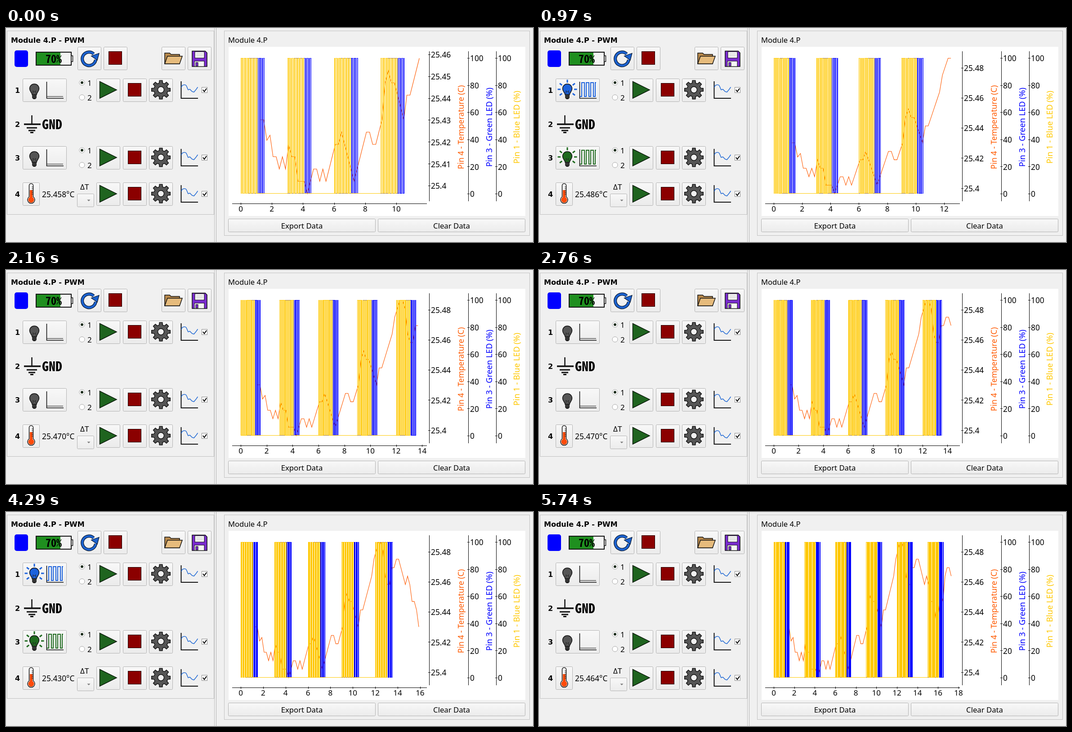
An HTML page with a canvas for the animation above (5810 ms loop, 1172x478 px).

```html
<!DOCTYPE html>
<html lang="en">
<head>
<meta charset="utf-8">
<title>Module 4.P</title>
<style>
  html, body { margin: 0; width: 100%; height: 100%; overflow: hidden; background: #f0f0f0; }
  canvas { display: block; }
</style>
</head>
<body>
<canvas id="stage" width="1172" height="478"></canvas>
<script>
const ctx = document.getElementById('stage').getContext('2d');
const LOOP = 5810;
const SANS = '"Noto Sans", "Open Sans", sans-serif';
const HEADING = '"DejaVu Sans", sans-serif';
const MONO = '"Noto Sans Mono CJK JP", "Noto Sans Mono CJK SC", "Liberation Mono", monospace';
const ORANGE = '#ff5a00', BLUE = '#0000ff', YELLOW = '#ffc800';

// Moments (ms) at which the display refreshes
const REFRESHES = [-120, 120, 380, 450, 510, 710, 910, 970, 1100, 1300, 1500, 1560, 1700, 1960,
  2160, 2300, 2500, 2760, 2890, 3100, 3370, 3430, 3570, 3760, 3960, 4160, 4290, 4490, 4560,
  4760, 4890, 5150, 5350, 5480, 5740];

// Temperature readings in sensor steps, one every 0.2 s
const READINGS = [0, 0, -1.67, -1.25, -3, -3, -4, -3, -4, -2, -3, -3, -5, -5, -5, -6, -5, -4, -4, -5,
  -4, -5, -4, -3, -2, -2, -1, -2, -3, -4, -5, -4, -3, -2, -1, -1, -2, -2, -1, 0,
  3, 4, 3, 3, 2, 1, 0, 2, 2, 3, 4, 5, 6, 8, 9, 10, 10, 9, 6, 5,
  5, 7, 7, 8, 8, 7, 6, 5, 6, 5, 3, 3, 2, 0, 2, 4, 3, 6, 7, 7, 6];
const degrees = step => 25.4302 + 0.00562 * step;

const TOP = 67.5, BOTTOM = 370, LEFT = 522;

function rect(x, y, w, h, fill, stroke, lineWidth = 1) {
  if (fill) { ctx.fillStyle = fill; ctx.fillRect(x, y, w, h); }
  if (stroke) { ctx.strokeStyle = stroke; ctx.lineWidth = lineWidth; ctx.strokeRect(x, y, w, h); }
}

function shape(path, fill, stroke, lineWidth = 1.5) {
  const p = new Path2D(path);
  if (fill) { ctx.fillStyle = fill; ctx.fill(p); }
  if (stroke) { ctx.strokeStyle = stroke; ctx.lineWidth = lineWidth; ctx.stroke(p); }
}

function circle(x, y, r, fill, stroke, lineWidth = 1.5) {
  shape(`M${x - r} ${y}a${r} ${r} 0 1 0 ${2 * r} 0a${r} ${r} 0 1 0 ${-2 * r} 0`, fill, stroke, lineWidth);
}

// y is the middle of the capitals
function label(text, x, y, { size = 17, weight = 400, align = 'left', color = '#000', font = SANS } = {}) {
  ctx.font = `${weight} ${size}px ${font}`;
  ctx.textAlign = align;
  ctx.fillStyle = color;
  ctx.fillText(text, x, y + size * 0.357);
}

function heading(text, x, y) {
  label(text, x, y, { size: 16, weight: 700, font: HEADING });
}

function button(x, y, w, h) {
  const shade = ctx.createLinearGradient(0, y, 0, y + h);
  shade.addColorStop(0, '#f8f8f8');
  shade.addColorStop(1, '#ebebeb');
  ctx.beginPath();
  ctx.roundRect(x + 0.5, y + 0.5, w - 1, h - 1, 2);
  ctx.fillStyle = shade;
  ctx.fill();
  ctx.strokeStyle = '#b2b2b2';
  ctx.lineWidth = 1;
  ctx.stroke();
}

function stopButton(x, y) {
  button(x, y, 53, 52);
  rect(x + 11.5, y + 10.5, 29, 29, '#8b0000', '#1a0000');
}

function gear(cx, cy) {
  const teeth = 8, points = [];
  for (let i = 0; i < teeth; i++) {
    for (const [turn, r] of [[-0.32, 15.5], [-0.2, 21], [0.2, 21], [0.32, 15.5]]) {
      const a = (i + turn) * 2 * Math.PI / teeth;
      points.push(`${cx + r * Math.cos(a)} ${cy + r * Math.sin(a)}`);
    }
  }
  shape(`M${points.join('L')}Z`, '#555', '#111');
  circle(cx, cy, 7, '#f1f1f1', '#111');
}

function channelControls() {
  button(201, 113, 53, 52);
  shape('M208.500 119.500V157L246 138.200Z', '#1f641f', '#0a1a0a');
  stopButton(260, 113);
  button(318, 113, 53, 52);
  gear(344.5, 138);
  shape('M389.500 119V157H427', null, '#111', 2);
  shape('M390 133Q391 128 394 127.500Q400 125 402 131L405 138L409 137L414 142L418 143L423 137L426.500 132',
    null, '#2a6fd6', 1.6);
  rect(435.5, 132.5, 12, 12, '#fff', '#8c8c8c');
  shape('M438 138L441 142L446 135', null, '#000', 2);
}

function radios() {
  for (const [text, y] of [['1', 122], ['2', 155]]) {
    circle(169, y, 6, '#fff', '#a6a6a6', 1);
    label(text, 181, y + 1);
  }
  circle(169, 122, 3, '#1c2c1c');
}

function ledButton(on, color) {
  button(37, 113, 98, 52);
  if (on) {
    for (const degree of [0, 38, 142, 180, 218, 270, 322]) {
      const a = degree * Math.PI / 180, c = Math.cos(a), s = Math.sin(a);
      shape(`M${63 + 15 * c} ${137 + 15 * s}L${63 + 21.5 * c} ${137 + 21.5 * s}`, null, color, 3);
    }
  }
  shape('M58 149C58 144 52.500 142 52.500 135.500A10.500 10.500 0 0 1 73.500 135.500C73.500 142 68 144 68 149Z',
    on ? color : '#555', '#111');
  shape('M58 148H68V156L65 159H61L58 156Z', '#222');
  shape('M58 151.500H68M58 154.500H68', null, '#666', 0.8);
  shape('M60 147V140L63 143L66 140V147', null, '#222', 1);
  shape('M90.500 120V157H128', null, '#111', 1.6);
  if (on) shape('M91 153H95V122H101V153H105V122H111V153H115V122H121V153H125V122H127', null, color, 2);
  else shape('M91 153H127', null, '#555', 1.4);
}

function atRow(dy, draw) {
  ctx.save();
  ctx.translate(0, dy);
  draw();
  ctx.restore();
}

function toolbar() {
  ctx.beginPath();
  ctx.roundRect(19, 50, 30, 37, 5);
  ctx.fillStyle = BLUE;
  ctx.fill();

  rect(67, 54, 78, 29, '#f4f4f4');
  rect(67, 54, 54, 29, '#1f8f1f');
  rect(67, 54, 78, 29, null, '#111', 2);
  rect(145, 62, 3.5, 13, '#f4f4f4', '#111', 1.5);
  label('70%', 106, 69, { size: 24, weight: 700, align: 'center', font: MONO });

  button(159, 42, 53, 52);
  const arc = 'M199.500 71A15 15 0 1 1 195 58';
  shape(arc, null, '#0a1a33', 7);
  shape(arc, null, '#1c62cf', 4.6);
  shape('M189.500 62.500L207 56.500L203 72Z', '#1c62cf', '#0a1a33', 1.3);

  stopButton(217, 42);

  button(346, 42, 53, 52);
  shape('M353 80V56H364L367 59H386V80Z', '#b98a4c', '#111');
  shape('M353 80L359 63H392L386 80Z', '#e6bb7c', '#111');

  button(404, 42, 53, 52);
  shape('M414 51.500H443L447 55.500V86H414Z', '#7a2bd0', '#111');
  rect(420, 53, 21, 14, '#f6f6f6', '#111');
  shape('M423 58H438M423 62H438', null, '#bbb', 1);
  rect(419, 74, 22, 12, '#f6f6f6', '#111');
  rect(422, 77, 5, 8, '#7a2bd0', '#111');
}

function controlPanel(led1, led3, temperature) {
  rect(2.5, 6.5, 460, 410, null, '#c0c0c0');
  rect(463, 0, 1, 478, '#bdbdbd');
  rect(467, 0, 1, 478, '#b0b0b0');
  heading('Module 4.P - PWM', 11, 27);
  toolbar();
  ['1', '2', '3', '4'].forEach((n, i) => heading(n, 20, [139, 215, 290, 371][i]));

  for (const [dy, on, color] of [[0, led1, '#1c62dc'], [151, led3, '#1f6a1f']]) {
    atRow(dy, () => { ledButton(on, color); radios(); channelControls(); });
  }
  atRow(232, channelControls);

  shape('M57.500 195V215', null, '#111', 2.5);
  shape('M40 215H77', null, '#111', 3.5);
  shape('M46 223H69M50 229H65M54 233.500H61', null, '#111', 2.8);
  label('GND', 80, 215, { size: 30, weight: 700, font: MONO });

  button(37, 345, 38, 52);
  shape('M51.500 377V352A4.500 4.500 0 0 1 60.500 352V377A8 8 0 1 1 51.500 377Z', '#fafafa', '#111');
  shape('M53 378V362H59V378A6.500 6.500 0 1 1 53 378Z', '#ff4a0a');
  shape('M57 355H60M57 359H60M57 363H60M57 367H60M57 371H60', null, '#111', 1);
  label(temperature.toFixed(3) + '°C', 80, 372, { size: 17.3 });
  label('ΔT', 165, 354.5);
  button(158, 370, 38, 30);
  shape('M180.500 383.500H187.500L184 387Z', '#777');
}

function verticalAxis(x, ticks, yOf) {
  rect(x, 52, 1, 335, '#000');
  for (const tick of ticks) {
    const y = yOf(tick);
    rect(x - 2, Math.round(y - 0.5), 5, 1, '#000');
    label(String(tick), x + 4, y + 0.5, { size: 17.3 });
  }
}

function axisTitle(text, x, color, size) {
  ctx.save();
  ctx.translate(x, 221.5);
  ctx.rotate(-Math.PI / 2);
  label(text, 0, 0, { size, align: 'center', color });
  ctx.restore();
}

// Bursts of eleven pulses, one burst every 3 s
function pulseTrain(color, offset, bursts, xOf) {
  const high = 67, low = 369;
  let last = Math.round(xOf(offset));
  for (let b = 0; b < bursts; b++) {
    for (let p = 0; p < 11; p++) {
      const start = 3 * b + offset + p * 0.1;
      const rise = Math.round(xOf(start)), fall = Math.round(xOf(start + 0.05));
      rect(last, low, rise - last + 1, 1, color);
      rect(rise, high, 1, low - high + 1, color);
      rect(rise, high, fall - rise + 1, 1, color);
      rect(fall, high, 1, low - high + 1, color);
      last = fall;
    }
  }
}

function plotPanel(elapsed, steps) {
  rect(485.5, 6.5, 679, 457, null, '#c0c0c0');
  label('Module 4.P', 494, 27, { size: 16.6 });
  rect(495, 42, 660, 378, '#fff');
  button(494, 426, 328, 30);
  button(827, 426, 328, 30);
  label('Export Data', 658, 442, { size: 16.7, align: 'center' });
  label('Clear Data', 991, 442, { size: 16.7, align: 'center' });

  const perSecond = 396 / elapsed;
  const xOf = seconds => LEFT + seconds * perSecond;
  const max = degrees(Math.max(...steps)), min = degrees(-6);
  const perDegree = (BOTTOM - TOP) / (max - min);
  const yOf = value => TOP + (max - value) * perDegree;

  ctx.beginPath();
  steps.forEach((step, i) => ctx.lineTo(xOf(1.465 + 0.2 * (i - 1)) + 0.5, yOf(degrees(step))));
  ctx.strokeStyle = ORANGE;
  ctx.lineWidth = 1.1;
  ctx.stroke();
  pulseTrain(BLUE, 0.45, Math.floor((elapsed - 1.485) / 3) + 1, xOf);
  pulseTrain(YELLOW, 0, Math.floor((elapsed - 1.1) / 3) + 1, xOf);

  rect(503, 392, 433, 1, '#000');
  for (let s = 0; xOf(s) <= 936; s += 2) {
    rect(Math.round(xOf(s)), 390, 1, 5, '#000');
    label(String(s), xOf(s), 404, { align: 'center' });
  }

  const first = Math.ceil((min - 17 / perDegree) * 100);
  const final = Math.floor((max + 16 / perDegree) * 100);
  const stride = final - first < 7 ? 1 : 2;
  const ticks = [];
  for (let c = Math.ceil(first / stride) * stride; c <= final; c += stride) ticks.push(c / 100);
  verticalAxis(941, ticks, yOf);
  const percent = [0, 20, 40, 60, 80, 100];
  const percentY = p => BOTTOM + 0.5 - p * 3.03;
  verticalAxis(1028, percent, percentY);
  verticalAxis(1090, percent, percentY);
  axisTitle('Pin 4 - Temperature (C)', 1012, ORANGE, 17.5);
  axisTitle('Pin 3 - Green LED (%)', 1075, BLUE, 18.1);
  axisTitle('Pin 1 - Blue LED (%)', 1136, YELLOW, 18.1);
}

function draw(refresh) {
  const elapsed = 11.565 + 1.007 * refresh / 1000;
  const phase = elapsed % 3;
  const steps = READINGS.slice(0, Math.floor((elapsed - 1.43) / 0.2) + 2);
  rect(0, 0, 1172, 478, '#f0f0f0');
  controlPanel(phase < 1.1, phase >= 0.485 && phase < 1.485, degrees(steps[steps.length - 1]));
  plotPanel(elapsed, steps);
}

let shown = null;
const origin = performance.now();
function frame() {
  const time = (performance.now() - origin) % LOOP;
  const refresh = REFRESHES.filter(r => r <= time).pop();
  if (refresh !== shown) draw(shown = refresh);
  requestAnimationFrame(frame);
}
frame();
</script>
</body>
</html>
```
